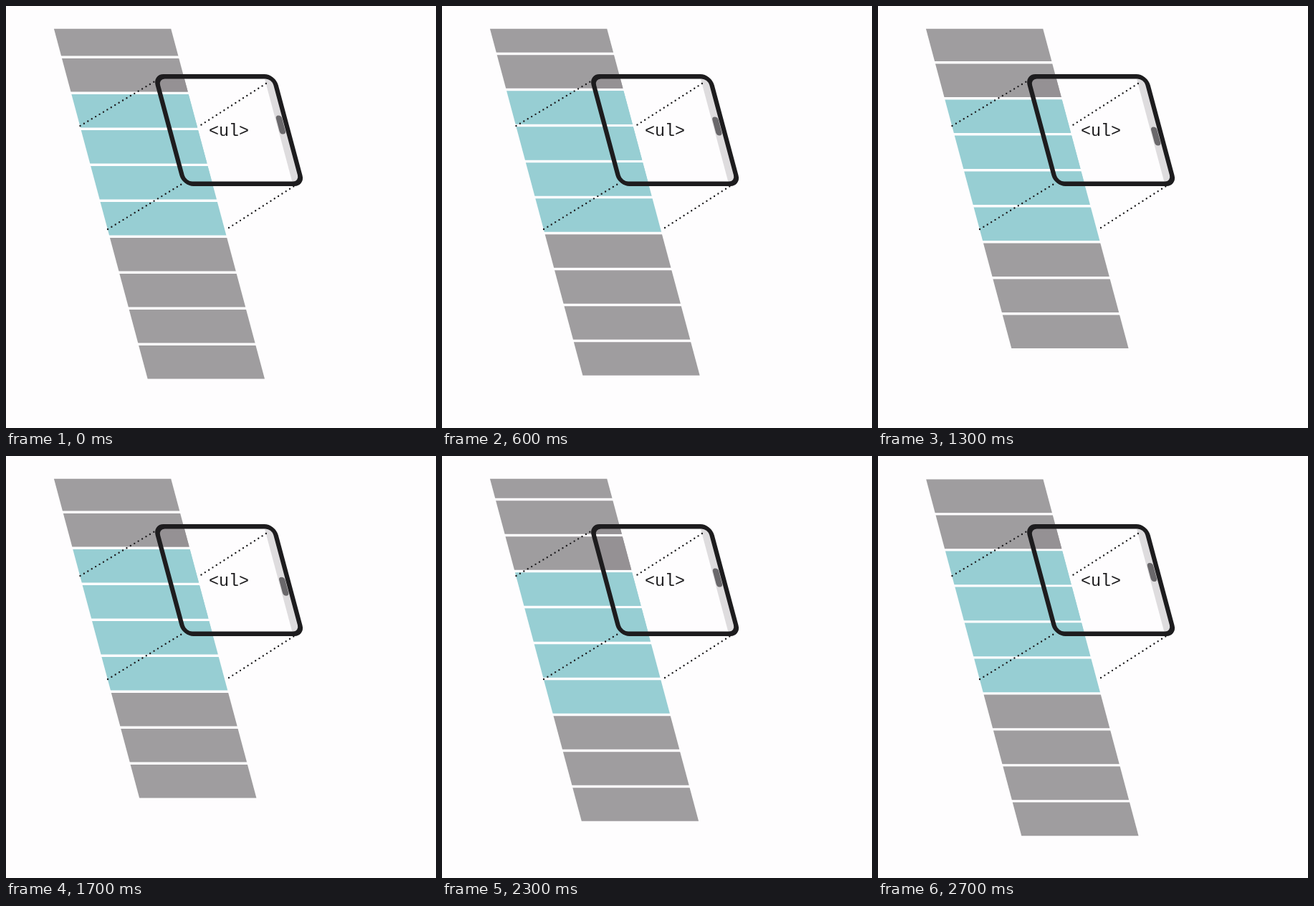
Write an HTML page with a canvas that moves like this. It is 600 by 588 pixels and loops after 2.8 s.

```html
<!DOCTYPE html>
<html lang="en">
<head>
<meta charset="utf-8">
<title>Scrolling list in a viewport</title>
<style>
  html, body { margin: 0; width: 100%; height: 100%; overflow: hidden; background: #fefdfe; }
  canvas { display: block; }
</style>
</head>
<body>
<canvas id="stage" width="600" height="588"></canvas>
<script>
const ctx = document.getElementById('stage').getContext('2d');
const LOOP = 2800, STEP = 100, SWING = 2500;
const SLANT = Math.tan(Math.PI / 12), TOP = 31.7;
const ROWS = 10, PITCH = 50, ROW_HEIGHT = 46.6;
const INK = '#1d1c1e', GREY = '#9f9d9f', SHADED = '#959194', BLUE = '#97ced3';

// Vertical list offset: a triangle wave with slightly rounded turns.
function scrollAt(time) {
  const phase = 2 * Math.PI * (time - 255) / SWING;
  return 21.9 * Math.asin(0.985 * Math.cos(phase)) - 29.55;
}

function roundRect(x, y, w, h, r) {
  ctx.beginPath();
  ctx.roundRect(x, y, w, h, r);
}

function drawRows(scroll, grey) {
  const firstBlue = scroll < -17 ? 3 : 2;
  for (let i = 0; i < ROWS; i++) {
    const y = 32.6 + i * PITCH + scroll;
    const top = Math.max(y, TOP), bottom = y + ROW_HEIGHT;
    if (bottom <= top) continue;
    ctx.fillStyle = i >= firstBlue && i < firstBlue + 4 ? BLUE : grey;
    ctx.fillRect(67, top, 163.3, bottom - top);
  }
}

function dottedLine(x1, y1, x2, y2) {
  ctx.beginPath();
  ctx.moveTo(x1, y1);
  ctx.lineTo(x2, y2);
  ctx.stroke();
}

function drawProjection() {
  ctx.save();
  ctx.strokeStyle = INK;
  ctx.lineWidth = 2.4;
  ctx.lineCap = 'round';
  ctx.setLineDash([0, 6.3]);
  dottedLine(103.5, 167, 210, 103.5);
  dottedLine(272.5, 165.5, 366, 106);
  dottedLine(142, 311, 247, 247);
  dottedLine(311, 309, 405, 249);
  ctx.restore();
}

function slanted(draw) {
  ctx.save();
  ctx.transform(1, 0, SLANT, 1, -SLANT * 32, 0);
  draw();
  ctx.restore();
}

function render(time) {
  const scroll = scrollAt(time);
  const screen = [190.9, 98.2, 164.7, 149.6, 12];
  ctx.fillStyle = '#fefdfe';
  ctx.fillRect(0, 0, 600, 588);

  slanted(() => {
    drawRows(scroll, GREY);
    roundRect(...screen);
    ctx.clip();
    drawRows(scroll, SHADED);
    ctx.fillStyle = '#dedcde';
    ctx.fillRect(342.3, 95, 20, 156);
  });

  drawProjection();

  slanted(() => {
    roundRect(343.4, 149 - 0.373 * scroll, 8.4, 26, 4.2);
    ctx.fillStyle = '#6a686b';
    ctx.fill();
    roundRect(...screen);
    ctx.strokeStyle = INK;
    ctx.lineWidth = 6.5;
    ctx.stroke();
  });

  ctx.fillStyle = INK;
  ctx.font = '23.3px "Liberation Mono", monospace';
  ctx.textAlign = 'center';
  ctx.fillText('<ul>', 311, 181);
}

function tick() {
  const time = performance.now() % LOOP;
  render(Math.floor(time / STEP) * STEP);
  requestAnimationFrame(tick);
}
tick();
</script>
</body>
</html>
```
